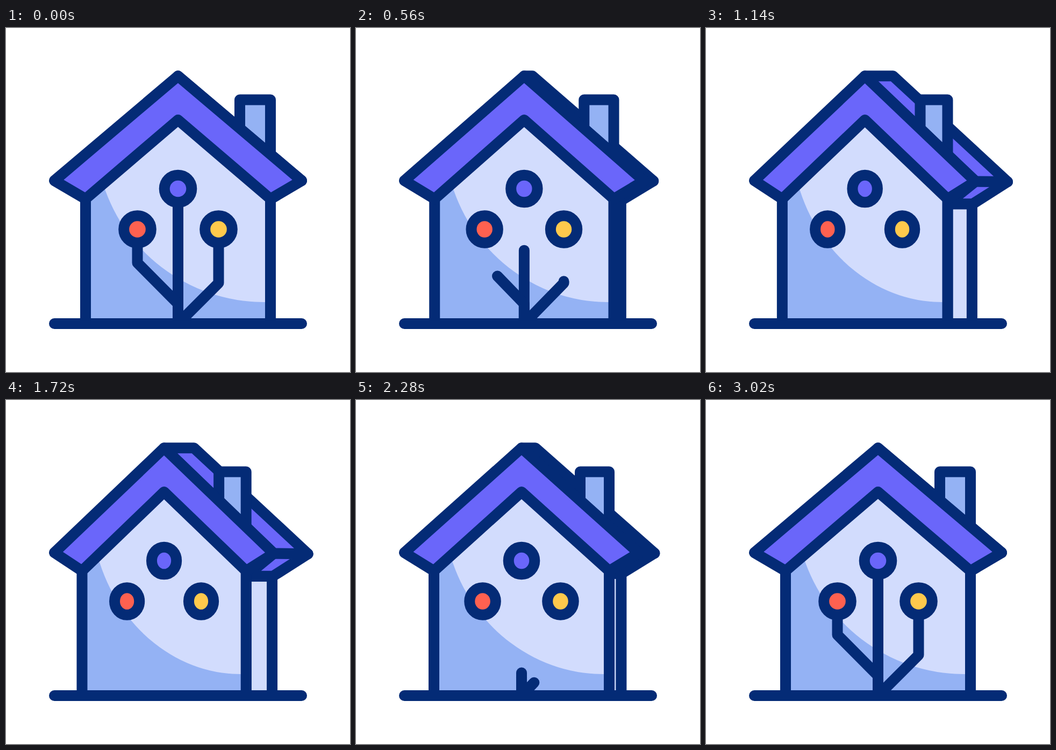
Animation, 640 px wide and 640 px high, one loop 3.6 s. Source, as an HTML page:

```html
<!DOCTYPE html>
<html lang="en">
<head>
<meta charset="utf-8">
<title>Smart house</title>
<style>
  html, body { margin: 0; width: 100%; height: 100%; overflow: hidden; background: #fff; }
  svg { display: block; width: 100%; height: 100%; }
  .ink { stroke: #042b76; stroke-width: 20; stroke-linecap: round; stroke-linejoin: round; }
  .line { fill: none; }
  .roof { fill: #6a66fa; }
  .shade { fill: #94b2f4; }
  .light { fill: #d2dcfd; }
</style>
</head>
<body>
<svg viewBox="0 0 640 640">
  <path id="sideWall" class="ink light"/>
  <path id="soffit" class="ink roof"/>
  <path id="sideRoof" class="ink roof"/>
  <path id="chimney" class="ink shade"/>
  <path id="wall" class="shade"/>
  <path id="glow" class="light"/>
  <path id="posts" class="ink line"/>
  <g id="wires"></g>
  <g id="nodes"></g>
  <path id="frontRoof" class="ink roof"/>
  <path class="ink line" d="M90 550H550"/>
</svg>
<script>
const LOOP = 3600;
const TURN = 1500;
const BACK_START = 1490;

const $ = id => document.getElementById(id);
const clamp = x => Math.min(1, Math.max(0, x));
const ramp = (t, from, to) => clamp((t - from) / (to - from));
const poly = points => 'M' + points.map(p => p.join(' ')).join('L') + 'Z';
const draw = (id, d) => $(id).setAttribute('d', d);

// Closed form of cubic-bezier(.5, 0, .5, 1)
function ease(x) {
  const s = 0.5 + Math.sinh(Math.asinh(4 * (x - 0.5)) / 3);
  return s * s * (3 - 2 * s);
}

function add(parent, name, attrs) {
  const el = document.createElementNS('http://www.w3.org/2000/svg', name);
  for (const key in attrs) el.setAttribute(key, attrs[key]);
  return $(parent).appendChild(el);
}

// Each wire runs from the ground up to its node
const wires = [
  [[320, 550], [320, 324.3]],
  [[320, 550], [320, 513], [244.5, 437], [244.5, 400]],
  [[320, 550], [395.5, 474.5], [395.5, 400]]
].map(points => ({ points, el: add('wires', 'path', { class: 'ink line', pathLength: 1 }) }));

const nodes = [
  [320, 299, '#6a66fa'],
  [244.5, 374.5, '#ff6150'],
  [395.5, 374.5, '#ffc94c']
].map(([x, y, fill]) => ({
  x, el: add('nodes', 'ellipse', { class: 'ink', cy: y, ry: 25.3, fill })
}));

function render(t) {
  const turn = t < BACK_START
    ? ease(clamp(t / TURN))
    : 1 - ease(ramp(t, BACK_START, BACK_START + TURN));
  const wire = t < BACK_START ? 1 - ramp(t, 222, 1078) : ramp(t, 2120, 2975);

  // The front face narrows towards its left eave
  const squash = 1 - 0.117 * turn;
  const fx = x => 90 + (x - 90) * squash;
  const front = points => poly(points.map(([x, y]) => [fx(x), y]));

  const apex = [fx(320), 89.3];
  const eave = [fx(550), 284 + 1.5 * turn];
  const backApex = [320 + 31 * turn, 89.3];
  const backEave = [550 + 12.2 * turn, 284 + 2.3 * turn];
  const backX = 492 + 3.2 * turn;
  const lowY = 318.5 + 9.7 * turn;
  const right = fx(492);

  draw('sideWall', poly([[right, lowY], [backX, lowY], [backX, 550], [right, 550]]));
  draw('soffit', poly([eave, backEave, [backX + 1.5 * turn, lowY], [right, lowY]]));
  draw('sideRoof', poly([apex, backApex, backEave, eave]));
  draw('chimney', front([[435, 133.5], [492, 133.5], [492, 236], [435, 187]]));
  draw('wall', front([[148, 318], [320, 171], [492, 318], [492, 550], [148, 550]]));
  draw('glow', `M${fx(181)} 291A${315 * squash} 315 0 0 0 ${right} 509.8V318L${fx(320)} 171Z`);
  draw('posts', `M${fx(148)} 318V550M${right} 318V550`);
  draw('frontRoof', poly([
    apex, eave, [right, 318], [fx(320), 171], [fx(148), 318], [90, 284]
  ]));

  const shrink = 1 - 0.09 * turn;
  const cx = x => fx(320) + (x - 320) * shrink;
  for (const { points, el } of wires) {
    el.setAttribute('d', 'M' + points.map(([x, y]) => cx(x) + ' ' + y).join('L'));
    el.setAttribute('stroke-dasharray', wire < 1 ? `${wire} 2` : 'none');
    el.setAttribute('visibility', wire > 0 ? 'visible' : 'hidden');
  }
  for (const { x, el } of nodes) {
    el.setAttribute('cx', cx(x));
    el.setAttribute('rx', 25.3 * shrink);
  }
}

const start = performance.now();
function tick() {
  render((performance.now() - start) % LOOP);
  requestAnimationFrame(tick);
}
tick();
</script>
</body>
</html>
```
